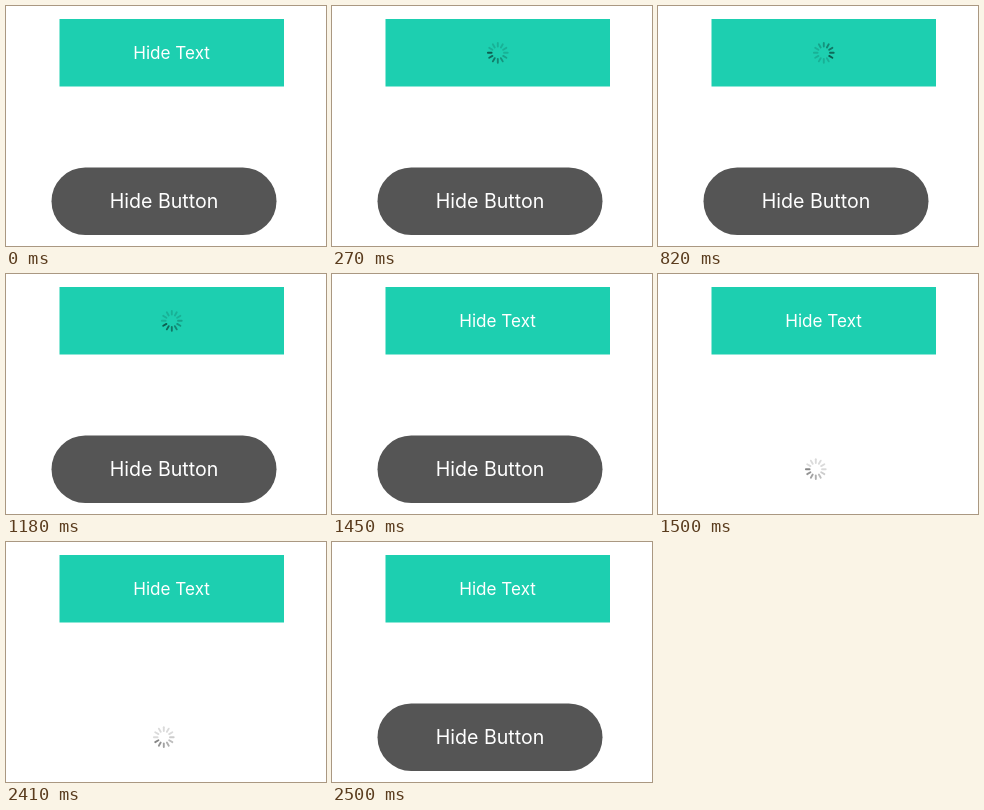
An HTML page for the animation above (2.72 s loop, 320 by 240 pixels).

```html
<!DOCTYPE html>
<html lang="en">
<head>
<meta charset="utf-8">
<title>Loading buttons</title>
<style>
  html, body { margin: 0; width: 100%; height: 100%; overflow: hidden; background: #fff; }
  svg { display: block; width: 100%; height: 100%; }
  text { font-family: Inter, Roboto, sans-serif; fill: #fff; text-anchor: middle; }
  .spinner line { stroke: #000; stroke-width: 1.9; stroke-linecap: round; }
</style>
</head>
<body>
<svg viewBox="0 0 320 240">
  <rect x="53.5" y="13" width="224.5" height="67.5" fill="#1dcfb0"/>
  <text id="hideText" x="165.6" y="53" font-size="17.1">Hide Text</text>
  <g id="hideButton">
    <rect x="45.5" y="161.5" width="225" height="67.5" rx="33.75" fill="#555"/>
    <text x="158" y="202.2" font-size="19.6">Hide Button</text>
  </g>
</svg>
<script>
const LOOP = 2720, SPOKES = 12, TURN = 1000, TRAIL = 6;
const svg = document.querySelector('svg');

function addNode(parent, name, attributes) {
  const node = document.createElementNS('http://www.w3.org/2000/svg', name);
  for (const key in attributes) node.setAttribute(key, attributes[key]);
  return parent.appendChild(node);
}

function makeSpinner(x, y) {
  const group = addNode(svg, 'g', { class: 'spinner', transform: `translate(${x} ${y})` });
  for (let i = 0; i < SPOKES; i++) {
    addNode(group, 'line', { y1: -6.2, y2: -9.9, transform: `rotate(${i * 360 / SPOKES})` });
  }
  return group;
}

// Each loader replaces its target between start and end.
const loaders = [
  { target: hideText, spinner: makeSpinner(165.8, 46.8), start: 140, end: 1230, origin: 475, dark: 0.55 },
  { target: hideButton, spinner: makeSpinner(157.8, 195.2), start: 1500, end: 2500, origin: 725, dark: 0.47 }
];

function draw(time) {
  for (const { target, spinner, start, end, origin, dark } of loaders) {
    const loading = time >= start && time < end;
    target.style.display = loading ? 'none' : '';
    spinner.style.display = loading ? '' : 'none';
    const head = Math.floor((time - origin) * SPOKES / TURN);
    [...spinner.children].forEach((spoke, i) => {
      const age = ((head - i) % SPOKES + SPOKES) % SPOKES;
      const fade = Math.max(0, 1 - age / TRAIL);
      spoke.style.opacity = 0.14 + (dark - 0.14) * fade;
    });
  }
}

const began = performance.now();
function tick() {
  draw((performance.now() - began) % LOOP);
  requestAnimationFrame(tick);
}
tick();
</script>
</body>
</html>
```
